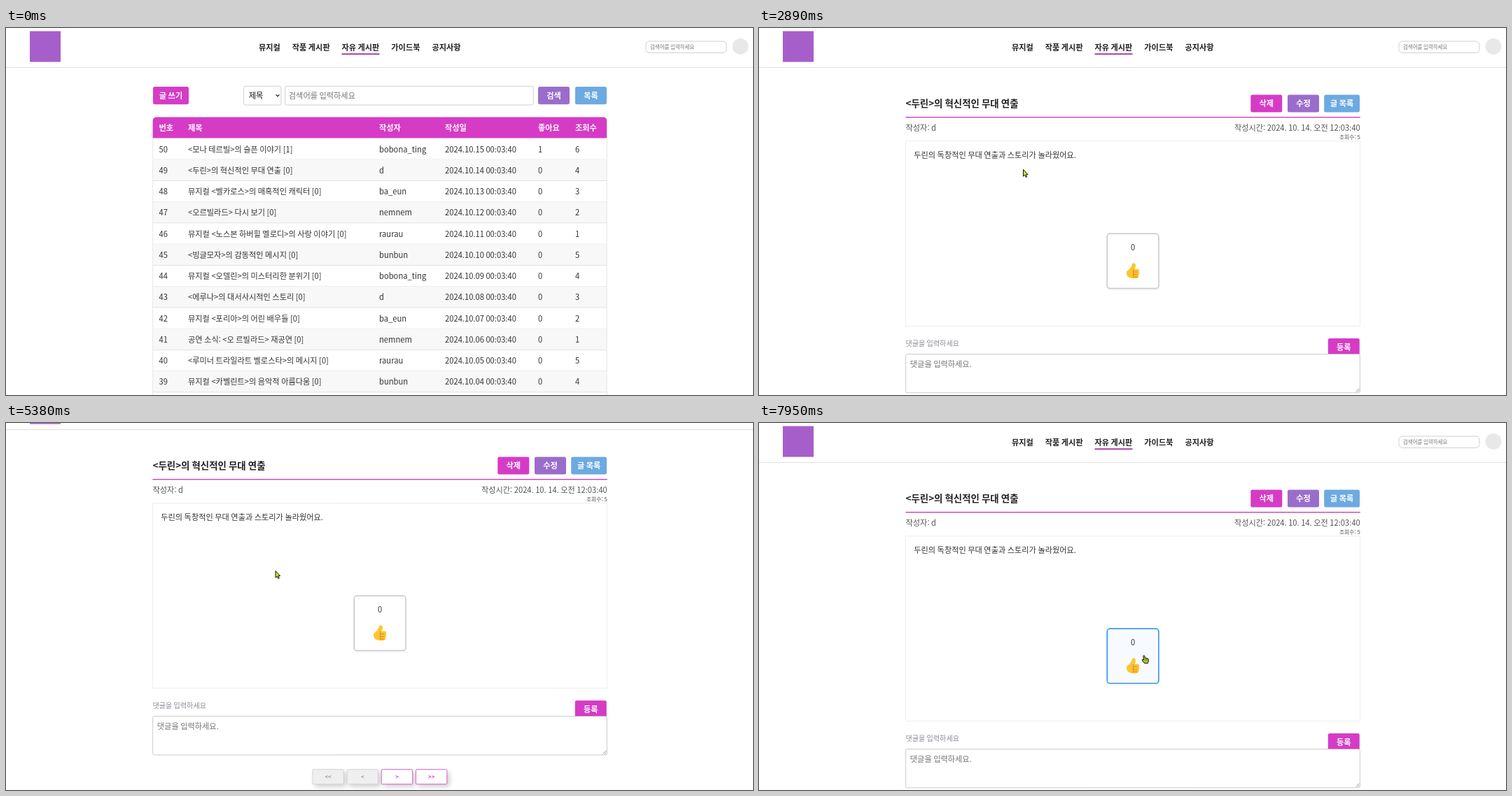
Animation of 1067x525 px, one loop 8000 ms. Source, as an HTML page with a canvas:

```html
<!DOCTYPE html>
<html lang="ko">
<head>
<meta charset="utf-8">
<title>자유 게시판</title>
<style>
html, body { margin: 0; width: 100%; height: 100%; overflow: hidden; background: #fff; }
canvas { display: block; width: 1067px; height: 525px; }
</style>
</head>
<body>
<canvas id="stage" width="1067" height="525"></canvas>
<script>
const ctx = document.getElementById('stage').getContext('2d');
const W = 1067, H = 525, LOOP = 8000, TICK = 67.5;
const FONT = '"Noto Sans CJK KR", "Noto Sans KR", "Noto Sans CJK JP", sans-serif';
const PINK = '#d63bc6', PURPLE = '#9b6dcb', BLUE = '#6caae1';
const INK = '#333', BASE = 11.2;

const TITLES = [
  '<모나 테르빌>의 슬픈 이야기 [1]',
  '<두린>의 혁신적인 무대 연출 [0]',
  '뮤지컬 <벨카로스>의 매혹적인 캐릭터 [0]',
  '<오르빌라드> 다시 보기 [0]',
  '뮤지컬 <노스본 하버힐 멜로디>의 사랑 이야기 [0]',
  '<빙글모자>의 감동적인 메시지 [0]',
  '뮤지컬 <오델린>의 미스터리한 분위기 [0]',
  '<에루나>의 대서사시적인 스토리 [0]',
  '뮤지컬 <포리아>의 어린 배우들 [0]',
  '공연 소식: <오 르빌라드> 재공연 [0]',
  '<루미너 트라일라트 벨로스타>의 메시지 [0]',
  '뮤지컬 <카벨린트>의 음악적 아름다움 [0]'
];
const AUTHORS = ['bobona_ting', 'd', 'ba_eun', 'nemnem', 'raurau', 'bunbun'];
const COLUMNS = [218.5, 260, 533, 627, 760, 813];

// Moments at which a run of movement begins.
const RUNS = [0, 440, 1270, 2150, 2890, 3420, 4040, 4650, 5380, 5980, 6790, 7480, 7750];

// Pointer tip: time, x, y.
const PATH = [
  [440, 975, 502], [650, 816, 446], [870, 600, 325], [1050, 440, 236],
  [1200, 380, 206], [1270, 384, 203], [1540, 378, 202], [2150, 378, 202],
  [2220, 377, 207], [2889, 377, 207], [2890, 377, 202], [3420, 377, 202],
  [3620, 380.5, 205], [4040, 380.5, 205], [4310, 382, 207], [4640, 382, 207],
  [4715, 384, 210], [5370, 384, 210], [5380, 384.5, 211], [5715, 387, 215],
  [6120, 387, 215], [6720, 525, 322], [6860, 558, 340], [7260, 570, 333],
  [7470, 570, 333], [7545, 550, 332]
];

const clamp = v => Math.max(0, Math.min(1, v));
const ramp = (t, a, b) => clamp((t - a) / (b - a));
const ease = p => p * p * (3 - 2 * p);
const mix = (a, b, p) => `rgb(${a.map((v, i) => Math.round(v + (b[i] - v) * p))})`;

function snap(t) {
  const start = RUNS.filter(s => s <= t).pop();
  return start + Math.floor((t - start) / TICK) * TICK;
}

function pointerAt(t) {
  const i = PATH.findIndex(k => k[0] > t);
  if (i < 0) return PATH[PATH.length - 1].slice(1);
  const [t0, x0, y0] = PATH[i - 1], [t1, x1, y1] = PATH[i];
  const p = ramp(t, t0, t1);
  return [x0 + (x1 - x0) * p, y0 + (y1 - y0) * p];
}

function text(str, x, mid, { size = BASE, weight = 400, color = INK, align = 'left', font = FONT } = {}) {
  ctx.font = `${weight} ${size}px ${font}`;
  ctx.fillStyle = color;
  ctx.textAlign = align;
  ctx.fillText(str, x, mid + size * 0.37);
}

function box(x, y, w, h, r, fill, stroke, line = 0.8) {
  ctx.beginPath();
  ctx.roundRect(x, y, w, h, r);
  if (fill) { ctx.fillStyle = fill; ctx.fill(); }
  if (stroke) { ctx.strokeStyle = stroke; ctx.lineWidth = line; ctx.stroke(); }
}

function rect(x, y, w, h, color) {
  ctx.fillStyle = color;
  ctx.fillRect(x, y, w, h);
}

function button(label, x, y, w, color) {
  box(x, y, w, 25.2, 2.4, color);
  text(label, x + w / 2, y + 12.8, { weight: 700, color: '#fff', align: 'center' });
}

function shadow(x, y, blur, color) {
  ctx.shadowOffsetX = x;
  ctx.shadowOffsetY = y;
  ctx.shadowBlur = blur;
  ctx.shadowColor = color;
}

function header() {
  rect(34, 4.5, 44, 44, '#a65fca');
  const nav = [['뮤지컬', 361], ['작품 게시판', 408.7], ['자유 게시판', 479.4], ['가이드북', 550.3], ['공지사항', 608.4]];
  for (const [label, x] of nav) text(label, x, 27.8, { weight: 700, color: '#222' });
  rect(479.5, 36.4, 54, 1.7, '#a0269a');
  box(914, 19, 115, 16.5, 5, '#fff', '#c4c4c4');
  text('검색어를 입력하세요', 920, 27.4, { size: 7.45, color: '#757575' });
  ctx.beginPath();
  ctx.arc(1049, 26.4, 11.4, 0, Math.PI * 2);
  ctx.fillStyle = '#e8e8e8';
  ctx.fill();
  rect(0, 56, W, 0.9, '#dcdcdc');
}

function list(hover) {
  button('글 쓰기', 210, 84, 51, PINK);
  box(339.5, 83.3, 53.4, 26.8, 2.5, '#fff', '#c4c4c4');
  text('제목', 346.8, 97, { color: '#111' });
  ctx.beginPath();
  ctx.moveTo(385.6, 95.3);
  ctx.lineTo(388, 97.7);
  ctx.lineTo(390.4, 95.3);
  ctx.strokeStyle = '#111';
  ctx.lineWidth = 1.2;
  ctx.stroke();
  box(398.7, 83.3, 354.6, 26.8, 2.5, '#fff', '#c4c4c4');
  text('검색어를 입력하세요', 403.8, 97, { color: '#757575' });
  button('검색', 760, 84, 45, PURPLE);
  button('목록', 813, 84, 45, BLUE);

  box(209.6, 127.6, 648.6, 30, [5, 5, 0, 0], PINK);
  ['번호', '제목', '작성자', '작성일', '좋아요', '조회수'].forEach((label, i) =>
    text(label, COLUMNS[i], 143, { weight: 700, color: '#fff' }));

  TITLES.forEach((title, i) => {
    const top = 157.8 + i * 30.25, mid = top + 15.7;
    if (i % 2) rect(210, top, 648, 30.25, '#f8f8f8');
    rect(210, top + 29.9, 648, 0.8, '#dcdcdc');
    const day = String(15 - i).padStart(2, '0');
    const views = i ? 5 - i % 5 : 6;
    const cells = [50 - i, title, AUTHORS[i % 6], `2024.10.${day} 00:03:40`, i ? 0 : 1, views];
    cells.forEach((cell, c) => text(String(cell), COLUMNS[c], mid));
    if (hover && i === 1) {
      ctx.font = `400 ${BASE}px ${FONT}`;
      rect(260, mid + 5.3, ctx.measureText(title).width, 0.9, INK);
    }
  });
  rect(209.4, 157.5, 0.7, 368, '#dcdcdc');
  rect(857.8, 157.5, 0.7, 368, '#dcdcdc');
}

function thumb(x, y) {
  ctx.save();
  ctx.translate(x, y);
  ctx.fillStyle = '#ffc531';
  ctx.beginPath();
  ctx.moveTo(-9, 1);
  ctx.bezierCurveTo(-6, -1, -2, -5, -1, -9.5);
  ctx.bezierCurveTo(-0.5, -12, 4, -11.5, 4, -7.5);
  ctx.bezierCurveTo(4, -5.5, 3, -4, 2.6, -2.6);
  ctx.lineTo(7, -2.6);
  ctx.bezierCurveTo(9.4, -2.4, 9.6, 0.6, 8.4, 1.4);
  ctx.bezierCurveTo(9.8, 2.6, 9.4, 5, 8.2, 5.5);
  ctx.bezierCurveTo(9, 7, 8, 10.4, 5.6, 10.6);
  ctx.bezierCurveTo(1, 11.3, -5, 10.6, -7.8, 7.6);
  ctx.quadraticCurveTo(-9.4, 5, -9, 1);
  ctx.fill();
  ctx.strokeStyle = '#dd8b1c';
  ctx.lineWidth = 1;
  ctx.beginPath();
  ctx.moveTo(0.6, -2.4);
  ctx.lineTo(0.6, 9.4);
  for (const dy of [1.6, 5.4, 8.6]) {
    ctx.moveTo(0.6, dy);
    ctx.lineTo(6.6, dy);
  }
  ctx.stroke();
  ctx.restore();
}

function likeButton(p) {
  ctx.save();
  shadow(0, 1.4, 3, 'rgba(0,0,0,.14)');
  box(497.3, 294.2, 73.6, 78.2, 4, mix([255, 255, 255], [247, 251, 255], p));
  ctx.restore();
  box(497.3, 294.2, 73.6, 78.2, 4, null, mix([200, 200, 200], [38, 139, 235], p), 1.4);
  text('0', 534, 314, { align: 'center' });
  thumb(534, 347.3);
}

function pager() {
  ['<<', '<', '>', '>>'].forEach((label, i) => {
    const x = 437.9 + i * 49.2, off = i < 2;
    ctx.save();
    shadow(3.5, 3.5, 7, 'rgba(0,0,0,.2)');
    box(x, 542.6, 44.4, 21, 1.5, off ? '#efefef' : '#fff');
    ctx.restore();
    box(x, 542.6, 44.4, 21, 1.5, null, off ? '#cfcfcf' : PINK);
    text(label, x + 22.2, 553.3, { size: 7.84, weight: 700, color: off ? '#999' : PINK, align: 'center' });
  });
}

function post(like) {
  text('<두린>의 혁신적인 무대 연출', 209.5, 108.4, { size: 13.44, weight: 700, color: '#222' });
  button('삭제', 702.3, 95.4, 45, PINK);
  button('수정', 755, 95.4, 45, PURPLE);
  button('글 목록', 807.2, 95.4, 50.8, BLUE);
  rect(209.4, 127, 649.4, 1.4, PINK);
  text('작성자: d', 209.5, 142.5, { color: '#555' });
  text('작성시간: 2024. 10. 14. 오전 12:03:40', 858.8, 142.5, { color: '#555', align: 'right' });
  text('조회수: 5', 858.8, 156, { size: 7.84, color: '#555', align: 'right' });
  box(209.6, 161.8, 649, 264.6, 0, null, '#e9e9e9', 0.8);
  text('두린의 독창적인 무대 연출과 스토리가 놀라웠어요.', 221.2, 181.8);
  likeButton(like);

  text('댓글을 입력하세요', 209.5, 451.2, { size: 10.08, weight: 500, color: '#868a92' });
  button('등록', 812.8, 443.9, 45, PINK);
  box(209.6, 466.5, 648.8, 55.3, 2, '#fff', '#bfbfbf');
  text('댓글을 입력하세요.', 215.8, 481.2, { color: '#757575' });
  ctx.beginPath();
  ctx.moveTo(852.6, 520.6);
  ctx.lineTo(857.4, 515.8);
  ctx.moveTo(855.4, 520.6);
  ctx.lineTo(857.4, 518.6);
  ctx.strokeStyle = '#777';
  ctx.lineWidth = 0.8;
  ctx.stroke();
  pager();
}

function statusBar(alpha) {
  if (!alpha) return;
  ctx.globalAlpha = alpha;
  box(-1, 516.2, 94, 10, [0, 2, 0, 0], '#27323a');
  text('testhouse:4000/forum/item/49', -0.5, 521.4, { size: 6.6, color: '#cfd4d8', font: '"Noto Sans", sans-serif' });
  ctx.globalAlpha = 1;
}

const ARROW = new Path2D('M.5 .5V10.2L2.7 8.3 4.2 11.6 5.8 10.9 4.3 7.7H7.2Z');
const HAND = new Path2D('M1.8 1.2Q2.6 -.1 3.7 1L4.6 4.1 8 4.7Q9.6 5.2 9.4 7.2L9 9.8 8.3 11.8H3.8L.8 8.4Q-.2 6.8 .9 6.2L2.7 7Z');
const KNUCKLES = new Path2D('M5.2 5.6L5.5 7.2M7 5.9L7.2 7.4');

function pointer(x, y, hand, color) {
  ctx.save();
  ctx.translate(hand ? x - 3 : x, y);
  ctx.lineJoin = 'round';
  ctx.lineWidth = 1;
  ctx.fillStyle = color;
  ctx.strokeStyle = '#141414';
  const shape = hand ? HAND : ARROW;
  ctx.fill(shape);
  ctx.stroke(shape);
  if (hand) {
    ctx.lineWidth = 0.6;
    ctx.stroke(KNUCKLES);
  }
  ctx.restore();
}

function draw(time) {
  const t = snap(time);
  const scroll = 47 * (ease(ramp(t, 3987, 4330)) - ease(ramp(t, 5940, 6137)));
  const scrolling = (t >= 4040 && t < 4640) || (t >= 5980 && t < 6700);
  const overTitle = t >= 1110 && t < 2280;
  const overLike = t >= 6700;

  rect(0, 0, W, H, '#fff');
  ctx.save();
  ctx.translate(0, -scroll);
  header();
  if (t < 2150) list(overTitle);
  else post(ramp(t, 6690, 6930));
  ctx.restore();

  statusBar(ramp(t, 1200, 1330) * (1 - ramp(t, 2420, 2680)));
  if (t >= 440) {
    const color = scrolling ? '#e0a52e' : overLike ? '#a9c424' : '#cdea12';
    pointer(...pointerAt(t), overTitle || overLike, color);
  }
}

function frame() {
  draw(performance.now() % LOOP);
  requestAnimationFrame(frame);
}
frame();
</script>
</body>
</html>
```
